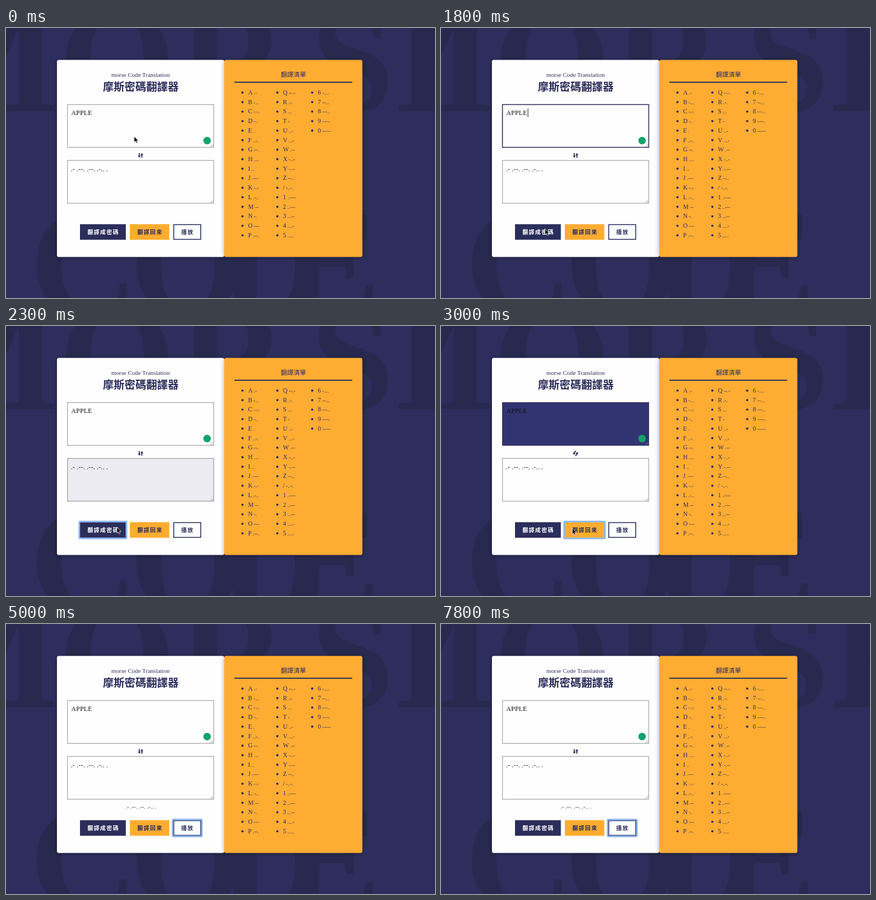
Animation of 800x503 px, one loop 8000 ms. Source, as an HTML page:

```html
<!DOCTYPE html>
<html lang="zh-Hant">
<head>
<meta charset="utf-8">
<title>摩斯密碼翻譯器</title>
<style>
  html, body { margin: 0; width: 100%; height: 100%; overflow: hidden; background: #2d2e5d; }
  svg { display: block; width: 800px; height: 503px; }
  text { font-family: "Liberation Serif", "Noto Serif", serif; fill: #2b2d5b; white-space: pre; }
  .cjk { font-family: "Noto Sans CJK TC", "Noto Sans CJK", sans-serif; text-anchor: middle; }
  .label { font-size: 10.3px; font-weight: 700; letter-spacing: 1.5px; }
  .giant { font-size: 280px; font-weight: 700; fill: #27294e; }
  .field { font-size: 12.5px; letter-spacing: .2px; fill: #111; }
  .ring { fill: none; stroke: #8cb6f2; stroke-width: 3; }
  .grip { fill: none; stroke: #888; stroke-width: .8; }
</style>
</head>
<body>
<svg id="stage" viewBox="0 0 800 503">
  <defs>
    <filter id="soft" x="-10%" y="-10%" width="120%" height="120%">
      <feDropShadow dx="0" dy="1" stdDeviation="4" flood-color="#000" flood-opacity=".35"/>
    </filter>
  </defs>
  <rect width="800" height="503" fill="#2d2e5d"/>
  <text class="giant" y="155" x="-166 98 322 568 728">MORSE</text>
  <text class="giant" y="531" x="44 230 396 512">CODE</text>

  <rect x="95" y="59.5" width="312" height="367" rx="3.5" fill="#fffeff" filter="url(#soft)"/>
  <rect x="407" y="59.5" width="257.5" height="367" rx="3.5" fill="#ffac30" filter="url(#soft)"/>

  <text x="251" y="91" font-size="11.4" text-anchor="middle">morse Code Translation</text>
  <text class="cjk" x="251.3" y="116.5" font-size="20.2" font-weight="700">摩斯密碼翻譯器</text>
  <text class="cjk" x="536" y="91.3" font-size="11.8" font-weight="500">翻譯清單</text>
  <rect x="426" y="100" width="219.5" height="2" fill="#2b2d5b"/>
  <g id="list"></g>

  <rect class="box" x="114.6" y="142.6" width="272.8" height="79.8"/>
  <rect class="box" x="114.6" y="246.6" width="272.8" height="79.8"/>
  <path class="grip" d="M381 221.5l5.5-5.5M384 221.5l2.5-2.5M381 325.5l5.5-5.5M384 325.5l2.5-2.5"/>
  <text class="field" x="121.5" y="162.3">APPLE</text>
  <text class="field" x="121" y="267">.- .--. .--. .-.. .</text>
  <rect id="caret" x="161.7" y="150" width="1" height="16" fill="#111"/>
  <circle cx="375" cy="209.8" r="7" fill="#15a36b"/>

  <path id="swap" fill="#2b2d5b"
    d="M-3.4-4.2h2v4.8h1.7l-2.7 3.7-2.7-3.7h1.7zM3.4 4.2h-2v-4.8h-1.7l2.7-3.7 2.7 3.7h-1.7z"/>
  <text id="played" x="251.5" y="343.5" font-size="10.9" text-anchor="middle">.- .--. .--. .-.. .</text>

  <rect x="138" y="365.5" width="85.5" height="29" fill="#2b2d5b"/>
  <rect x="231" y="365.5" width="73.5" height="29" fill="#ffac30"/>
  <rect x="312.8" y="366.3" width="50.4" height="27.4" fill="#fffeff" stroke="#2b2d5b" stroke-width="1.6"/>
  <rect class="ring" x="136.7" y="364.2" width="88" height="31.6" rx="1.5"/>
  <rect class="ring" x="229.7" y="364.2" width="76" height="31.6" rx="1.5"/>
  <rect class="ring" x="310.7" y="364.2" width="54.6" height="31.6" rx="1.5"/>
  <text class="cjk label" x="181.5" y="384" style="fill:#fff">翻譯成密碼</text>
  <text class="cjk label" x="268.6" y="384">翻譯回來</text>
  <text class="cjk label" x="338.6" y="384">播放</text>

  <path id="arrow" d="M0 0v11l2.5-2.3 1.7 3.8 2-.9-1.7-3.7h3.4z" fill="#000" stroke="#fff" stroke-width=".8"/>
  <path id="beam" d="M-2-5q2 0 2 1.5q0-1.5 2-1.5M0-3.5v7M-2 5q2 0 2-1.5q0 1.5 2 1.5M-1 0h2"
    fill="none" stroke="#111" stroke-width="1"/>
</svg>
<script>
const LOOP = 8000, STEP = 100;
const FOCUS = 600, ENCODE = 1850, DECODE = 2950, PLAY = 4400, LEAVE = 4900;
const FLASH = 700, SPIN = 350;

const codes = ("A .-,B -...,C -.-.,D -..,E .,F ..-.,G --.,H ....,I ..,J .---,K -.-,L .-..,M --,N -.,O ---,P .--.," +
  "Q --.-,R .-.,S ...,T -,U ..-,V ...-,W .--,X -..-,Y -.--,Z --..,/ -..-.,1 .----,2 ..---,3 ...--,4 ....-,5 .....," +
  "6 -....,7 --...,8 ---..,9 ----.,0 -----").split(",");

// time, x, y
const path = [
  [0, 239, 202], [100, 239, 202], [500, 237, 190], [1100, 237, 190],
  [1700, 194, 374], [2100, 194, 374], [2700, 243, 377], [3000, 245, 377],
  [3300, 266, 379], [3600, 266, 379], [3800, 270, 381], [4000, 270, 381],
  [4300, 338, 379], [4500, 338, 379], [LEAVE, 716, 515]
];

const $ = id => document.getElementById(id);
const boxes = document.querySelectorAll(".box");
const rings = document.querySelectorAll(".ring");
const clamp = x => Math.min(1, Math.max(0, x));
const show = (el, on) => el.setAttribute("visibility", on ? "visible" : "hidden");
const mix = (a, b, k) => `rgb(${a.map((v, i) => Math.round(v + (b[i] - v) * k))})`;
const NAVY = [43, 45, 91], GLOW = [38, 40, 106], GREY = [160, 160, 160], WHITE = [255, 254, 255];

$("list").innerHTML = codes.map((row, i) => {
  const [key, code] = row.split(" ");
  const x = 441 + 65 * Math.floor(i / 16), y = 120.3 + 17.73 * (i % 16);
  return `<circle cx="${x}" cy="${y}" r="2.1" fill="#2b2d5b"/>` +
    `<text x="${x + 10.5}" y="${y + 3.6}" font-size="11.5">${key}<tspan font-size="9.8"> ${code}</tspan></text>`;
}).join("");

// cubic-bezier(.25, .1, .25, 1)
function ease(x) {
  let lo = 0, hi = 1, s = .5;
  const bez = (a, b) => 3 * a * s * (1 - s) ** 2 + 3 * b * s * s * (1 - s) + s ** 3;
  for (let i = 0; i < 18; i++) {
    s = (lo + hi) / 2;
    if (bez(.25, .25) < x) lo = s; else hi = s;
  }
  return bez(.1, 1);
}

function cursorAt(t) {
  const i = Math.max(1, path.findIndex(p => p[0] >= t));
  const [t0, x0, y0] = path[i - 1], [t1, x1, y1] = path[i];
  const u = clamp((t - t0) / (t1 - t0)), k = u * u * (3 - 2 * u);
  return [x0 + (x1 - x0) * k, y0 + (y1 - y0) * k];
}

function paintBox(box, t, start, focused) {
  const k = t < start ? 1 : ease(clamp((t - start) / FLASH));
  box.setAttribute("fill", mix(GLOW, WHITE, k));
  box.setAttribute("stroke", focused ? mix(NAVY, NAVY, 0) : mix(NAVY, GREY, k));
  box.setAttribute("stroke-width", focused ? 1.6 : 1.2);
}

function render(t) {
  const typing = t >= FOCUS && t < ENCODE;
  paintBox(boxes[0], t, DECODE, typing);
  paintBox(boxes[1], t, ENCODE, false);
  show($("caret"), typing && (t - FOCUS) % 1000 < 500);

  const spun = [ENCODE, DECODE].reduce((sum, s) => sum + 180 * ease(clamp((t - s) / SPIN)), 0);
  $("swap").setAttribute("transform", `translate(251 237.3) rotate(${spun})`);

  show(rings[0], t >= ENCODE && t < DECODE);
  show(rings[1], t >= DECODE && t < PLAY);
  show(rings[2], t >= PLAY);
  show($("played"), t >= PLAY);

  const seen = t < LEAVE;
  const [x, y] = cursorAt(Math.min(t, LEAVE));
  const inBox = x > 114 && x < 388 && (y > 142 && y < 223 || y > 246 && y < 327);
  const beam = inBox && t >= 100;
  for (const id of ["arrow", "beam"]) $(id).setAttribute("transform", `translate(${x} ${y})`);
  show($("arrow"), seen && !beam);
  show($("beam"), seen && beam);
}

const begin = performance.now();
function tick() {
  const t = (performance.now() - begin) % LOOP;
  render(Math.floor(t / STEP) * STEP);
  requestAnimationFrame(tick);
}
tick();
</script>
</body>
</html>
```
